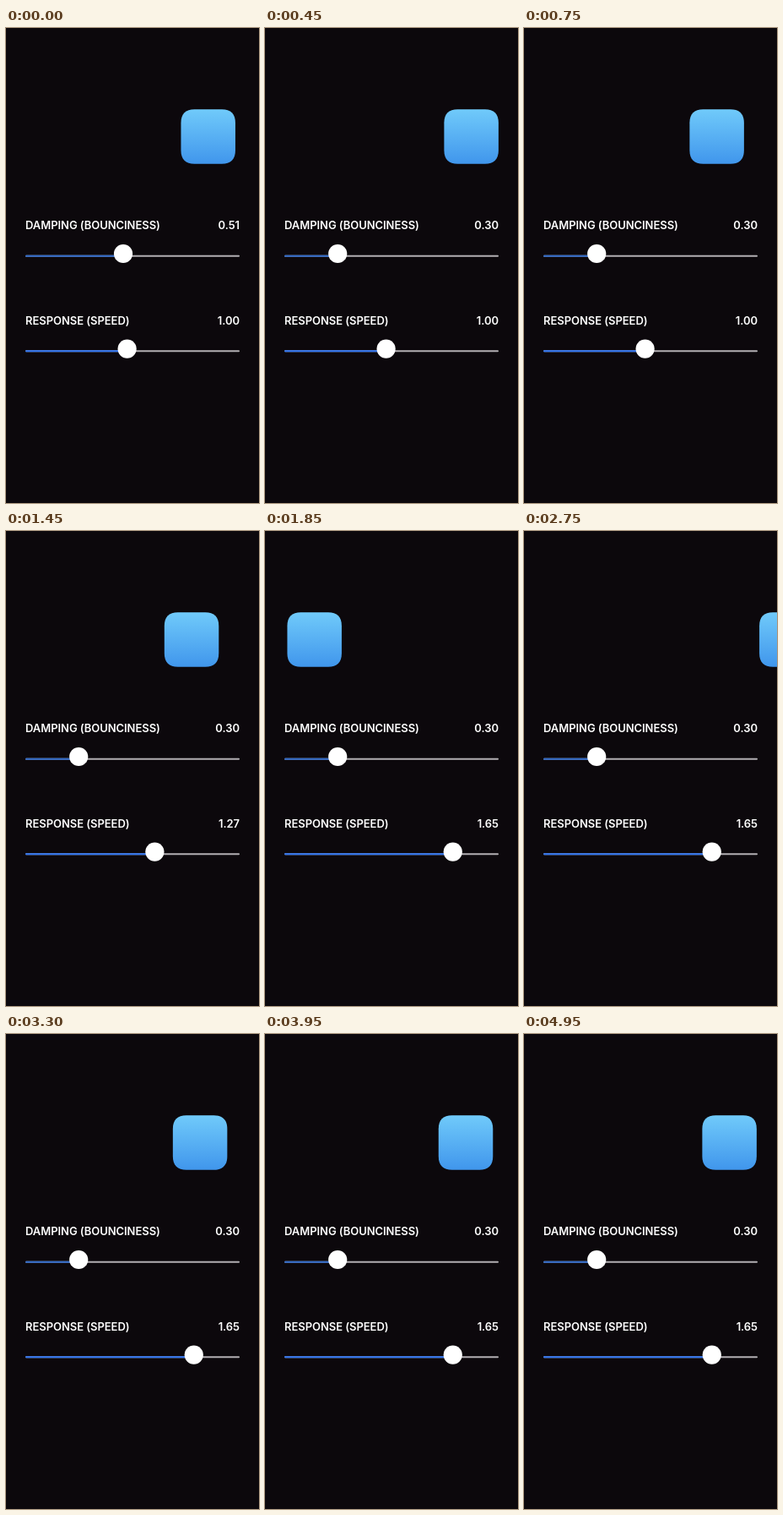
Write an HTML page that moves like this. It is 300 px wide and 562 px high and loops after 5000 ms.

```html
<!DOCTYPE html>
<html lang="en">
<head>
<meta charset="utf-8">
<title>Spring settings</title>
<style>
  html, body { margin: 0; width: 100%; height: 100%; overflow: hidden; background: #0c080c; }
  svg { display: block; width: 100%; height: 100%; }
  text { font: 600 13px Inter, "Liberation Sans", sans-serif; fill: #fff; letter-spacing: -0.05px; }
  .value { text-anchor: end; }
</style>
</head>
<body>
<svg viewBox="0 0 300 562">
  <defs>
    <linearGradient id="sky" x1="0" y1="0" x2="0" y2="1">
      <stop offset="0" stop-color="#70cafa"/>
      <stop offset="1" stop-color="#4096ec"/>
    </linearGradient>
  </defs>
  <rect width="300" height="562" fill="#0c080c"/>
  <path id="box" fill="url(#sky)"
    d="M16 0H48.5C59 0 64.5 5.5 64.5 16V48.5C64.5 59 59 64.5 48.5 64.5H16C5.5 64.5 0 59 0 48.5V16C0 5.5 5.5 0 16 0Z"/>
  <g id="sliders"></g>
</svg>
<script>
const LOOP = 5000, STEP = 50;
const START_X = 24, REST_X = 212;
const NS = "http://www.w3.org/2000/svg";
const box = document.getElementById("box");
const sliders = document.getElementById("sliders");

// Each run restarts the box at the left with its own spring.
const runs = [
  { at: -1160, damping: 0.51, response: 1 },
  { at: 460, damping: 0.3, response: 1 },
  { at: 1807, damping: 0.3, response: 1.65 }
];

function add(parent, tag, attrs, text = "") {
  const el = document.createElementNS(NS, tag);
  for (const key in attrs) el.setAttribute(key, attrs[key]);
  el.textContent = text;
  parent.appendChild(el);
  return el;
}

function makeSlider(label, top, color, toX) {
  const g = add(sliders, "g", { transform: `translate(0 ${top})` });
  add(g, "text", { x: 23, y: 0 }, label);
  const value = add(g, "text", { x: 277, y: 0, class: "value" });
  add(g, "rect", { x: 23, y: 30.8, width: 254, height: 2, rx: 1, fill: "#b2afb3" });
  const fill = add(g, "rect", { x: 23, y: 30.8, height: 2, rx: 1, fill: color });
  const knob = add(g, "circle", { cy: 29.1, r: 11.1, fill: "#fff" });
  return v => {
    const x = toX(v);
    value.textContent = v.toFixed(2);
    fill.setAttribute("width", x - 23);
    knob.setAttribute("cx", x);
  };
}

const setDamping = makeSlider("DAMPING (BOUNCINESS)", 237.9, "#2b66c6",
  v => 86.2 + (v - 0.3) * 251.5);
const setResponse = makeSlider("RESPONSE (SPEED)", 350.5, "#2c72f2",
  v => 143.6 + (v - 1) * 121.8);

function drag(t, begin, end, from, to) {
  const p = Math.min(1, Math.max(0, (t - begin) / (end - begin)));
  return from + (to - from) * p * p * (3 - 2 * p);
}

// Underdamped spring: 1 at the start, settling to 0.
function spring(s, damping, response) {
  const w = 2 * Math.PI / response;
  const root = Math.sqrt(1 - damping * damping);
  const a = w * root * s;
  return Math.exp(-damping * w * s) * (Math.cos(a) + damping / root * Math.sin(a));
}

function draw(t) {
  const run = runs.filter(r => r.at <= t).pop();
  const offset = spring((t - run.at) / 1000, run.damping, run.response);
  const x = REST_X - (REST_X - START_X) * offset;
  box.setAttribute("transform", `translate(${x.toFixed(2)} 96.3)`);
  setDamping(drag(t, 50, 430, 0.51, 0.3));
  setResponse(drag(t, 1200, 1765, 1, 1.65));
}

const began = performance.now();
function tick() {
  const t = Math.max(0, performance.now() - began) + 4;
  draw(Math.floor(t % LOOP / STEP) * STEP);
  requestAnimationFrame(tick);
}
draw(0);
requestAnimationFrame(tick);
</script>
</body>
</html>
```
